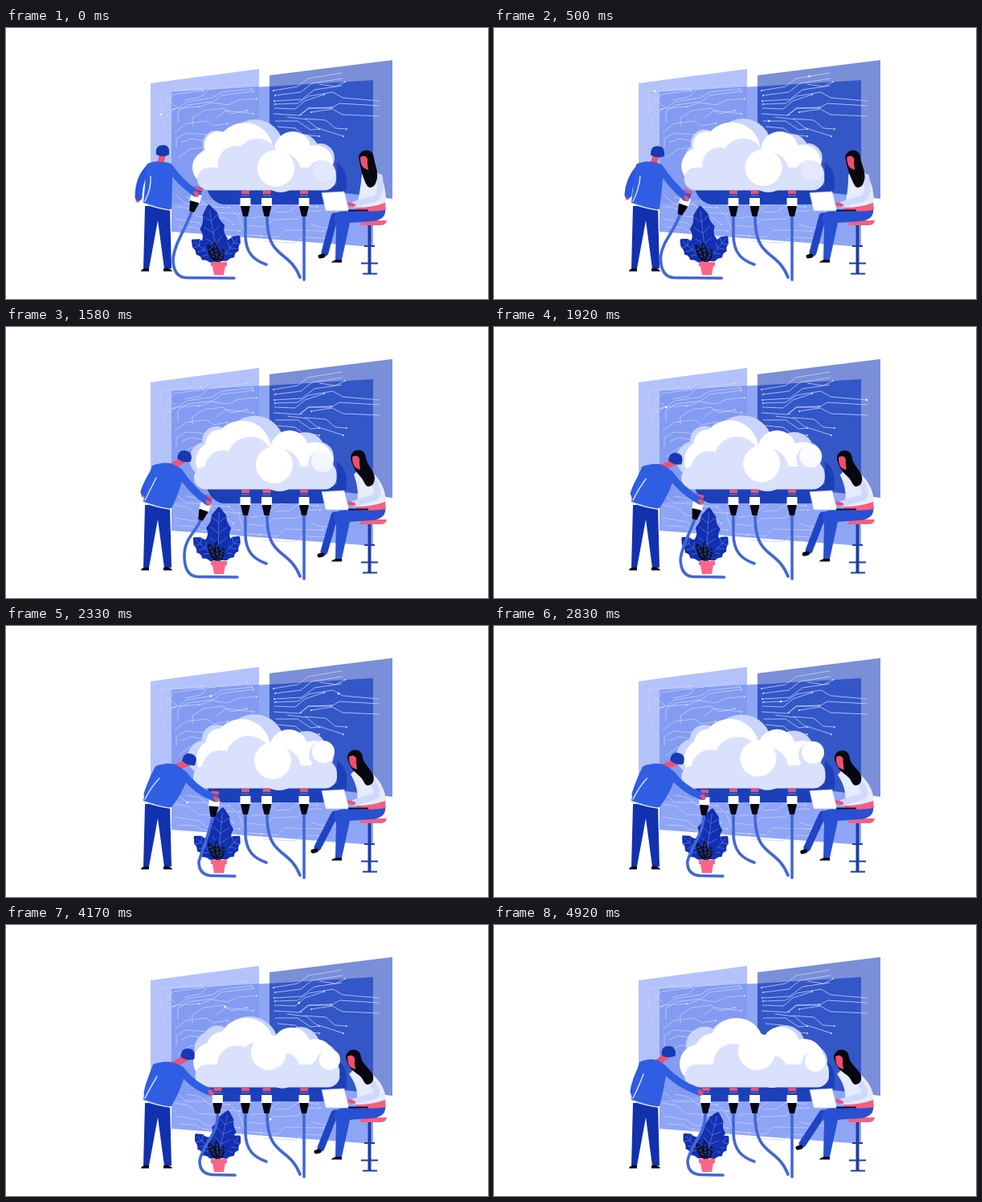
Recreate the animation shown at these times as an HTML page. Size 600 by 338 pixels, loop 5.01 s.

```html
<!DOCTYPE html>
<html lang="en">
<head>
<meta charset="utf-8">
<title>Cloud connection</title>
<style>
html, body { margin: 0; width: 100%; height: 100%; overflow: hidden; background: #fff; }
svg { display: block; width: 600px; height: 338px; }
.trace path { fill: none; stroke: #c3cffc; stroke-width: 1; marker-end: url(#dot); opacity: .8; }
.cable { fill: none; stroke: #4267d6; stroke-width: 3.6; stroke-linecap: round; stroke-linejoin: round; }
.limb { fill: none; stroke-linecap: round; stroke-linejoin: round; }
.back { fill: #c9d5fc; }
.puff { fill: #fff; }
.front { fill: #dae1fd; }
</style>
</head>
<body>
<svg viewBox="0 0 600 338">
  <defs>
    <marker id="dot" viewBox="-2 -2 4 4" markerWidth="3" markerHeight="3"><circle r="1.5" fill="#d5defd"/></marker>
    <g id="plug">
      <path d="M-5-9H5V0H-5z" fill="#1d3eb8"/>
      <path d="M-5-9H5v4H-5z" fill="#e9546f"/>
      <path d="M-5-3H5" stroke="#6f83d8"/>
      <path d="M-6.5 0h13v11h-13z" fill="#fff"/>
      <path d="M-6 10H6L3 23h-6z" fill="#05060f"/>
    </g>
  </defs>

  <path d="M180 69L315 51V208L180 222z" fill="#b4c2fb"/>
  <path d="M206 80L457 65V273L206 254z" fill="#8fa5f5"/>
  <path d="M206 80L315 73V208L206 219z" fill="#839cf1"/>
  <path d="M328 59L481 40V213L328 195z" fill="#7b8fd8"/>
  <path d="M328 73L457 65V210L328 195z" fill="#3457c7"/>
  <g id="traces" class="trace"></g>
  <g id="pulses" fill="#fff"></g>

  <path d="M249 197H412V168Q425 176 424 196Q423 219 402 220H270Q254 217 249 197z" fill="#1c3fba"/>
  <g id="cloud"></g>

  <g class="cable">
    <path d="M298 235V258C298 282 310 290 324 295"/>
    <path d="M325 235C325 290 352 275 366 311"/>
    <path d="M371 235V314"/>
  </g>
  <use href="#plug" x="298" y="212"/>
  <use href="#plug" x="324.500" y="212"/>
  <use href="#plug" x="371" y="212"/>

  <g id="plant"></g>
  <path d="M255 292H275V297H273L271 308H259L257 297H255z" fill="#fb6588"/>

  <g id="stool">
    <path d="M452.500 246V306" stroke="#1c3cab" stroke-width="4"/>
    <path d="M442 293.500H463M444 306.500H462M446 272H459" stroke="#1c3cab" stroke-width="2"/>
    <path d="M440 246Q441 240 452 240H474Q473 246 466 246z" fill="#f5607f"/>
  </g>

  <g id="woman">
    <path id="shin" class="limb" stroke="#1f44c4" stroke-width="9"/>
    <path id="shoe" class="limb" stroke="#05060f" stroke-width="5"/>
    <path d="M405 292Q411 287 418 289V292.500H405z" fill="#05060f"/>
    <path d="M472 225Q474 239 456 241L428 243L418 289H410L411 246Q403 229 422 228z" fill="#2850d2"/>
    <path id="top" fill="#e6ebfe"/>
    <path d="M436 224Q456 224 472 218L473 227Q458 230 436 228z" fill="#f5607f"/>
    <path id="sleeve" class="limb" stroke="#cfd9fc" stroke-width="8"/>
    <path class="limb" d="M433 221L424 219" stroke="#f0506e" stroke-width="4"/>
    <path id="hair" fill="#07070f"/>
    <path id="face" fill="#ef4f6c"/>
    <path d="M393 205.500L421 204L427 228H398z" fill="#fff" stroke="#b9c7f8" stroke-width=".7"/>
    <path d="M426 227.500H451" stroke="#0a1030" stroke-width="2"/>
  </g>

  <path id="cord" class="cable"/>
  <use id="held" href="#plug"/>

  <g id="man">
    <path d="M173 222H204L206 300H197L189 240L178 300H171z" fill="#1131ae"/>
    <path d="M168 303Q170 299 178 300V303.500H168zM196 303V300Q203 298 207 303V303.500H196z" fill="#05060f"/>
    <path id="rearHand" class="limb" stroke="#f0506e" stroke-width="5"/>
    <path id="rearArm" class="limb" stroke="#2b57dc" stroke-width="9"/>
    <path id="neck" class="limb" stroke="#ee5270" stroke-width="8"/>
    <path id="jacket" fill="#2f5ee2"/>
    <path id="arm" class="limb" stroke="#2f5ee2" stroke-width="9"/>
    <path id="hand" class="limb" stroke="#ee5270" stroke-width="5"/>
    <path id="trim" class="limb" stroke="#d4defd" stroke-width="1.500"/>
    <path id="cap" fill="#1839b4"/>
  </g>
</svg>
<script>
const LOOP = 5010;
const POSES = [0, 1000, 1580, 2330, 3420, 4170, 4920];
const THIRDS = [0, 2330, 4920];
const $ = id => document.getElementById(id);
const draw = (id, d) => $(id).setAttribute('d', d);

function add(parent, tag, attrs) {
  const el = document.createElementNS('http://www.w3.org/2000/svg', tag);
  for (const k in attrs) el.setAttribute(k, attrs[k]);
  return $(parent).appendChild(el);
}

// Smooth curve through rows of values, without overshoot.
function track(rows) {
  const times = rows.length === 3 ? THIRDS : POSES;
  const last = times.length - 1;
  return t => {
    t = Math.min(t, times[last]);
    let i = 0;
    while (i < last - 1 && t >= times[i + 1]) i++;
    const h = times[i + 1] - times[i], u = (t - times[i]) / h;
    return rows[0].map((_, k) => {
      const slope = j => (rows[j + 1][k] - rows[j][k]) / (times[j + 1] - times[j]);
      const tangent = j => {
        if (j === 0) return slope(0);
        if (j === last) return slope(last - 1);
        const a = slope(j - 1), b = slope(j);
        return a * b <= 0 ? 0 : 2 * a * b / (a + b);
      };
      const a = rows[i][k], b = rows[i + 1][k];
      const e = u * u * (3 - 2 * u);
      return a + (b - a) * e + h * u * (1 - u) * ((1 - u) * tangent(i) - u * tangent(i + 1));
    });
  };
}

// Circuit traces, by panel
const leftTraces = [
  'M193 108V79l50-4', 'M198 96l10-13 38-5', 'M222 90l20-4 10-9 48-7',
  'M194 104l20-4 11-8 32-5 11-7 38-4', 'M214 118v-14l12-8 32-4 10-8 40-5',
  'M232 122v-10l14-9 24-3 10 7 20-4', 'M210 130l14-11 26-3 8 6 18-3',
  'M212 150v-12l12-7 26 2 10 7', 'M214 162l15-11 24-3', 'M196 124v-12l14-11',
  'M262 112l12-9 34 4', 'M240 99l16-6 20 3 14-6 22-2', 'M218 143l12-5 17 3', 'M200 88l14 12 26-2'
];
const rightTraces = [
  'M418 56l-42 7-13 10-30 5', 'M419 63l-38 6-14 11-32 4', 'M418 72l-34 5-16 12-34 2',
  'M465 91l-46-4-12-7-30 5-14 9-28 1', 'M465 97l-50-3-10 6h-28l-10 8',
  'M465 110l-46-2-13-7-26 4', 'M334 100l26 1 12-10 24-8', 'M333 107l32 2 11-9 29-1',
  'M335 116h28l16 11 11-1', 'M350 111l24 3 12 10 34 11', 'M372 113l26 2 12 10 14 1',
  'M338 123l22 2 10 8 20 2', 'M390 70l20 3 12-6'
];
const lowTraces = [
  'M211 208l14 12h24l12 10 30 2', 'M209 222l18 3 12 10 34 2 10 8', 'M210 238l30 5 9 7 42 3',
  'M214 248l22 1 8 5 42 6', 'M224 211l18 3 10 9 26 1', 'M300 246l22 2 11-9 30-1 8-9 20-1',
  'M302 258l36 3 9-9 48 1', 'M304 237l20-2 13-12 10-5', 'M320 266l40 2 10-7 26 1',
  'M335 230l18-1 9-7 26 1', 'M380 245l14 4 26 2', 'M280 226l10 10 8 22 20 1'
];
const traces = [...leftTraces, ...rightTraces, ...lowTraces].map(d => add('traces', 'path', { d }));
const pulses = [0, 3, 5, 14, 17, 20, 22, 27, 32, 34].map((n, i) => ({
  path: traces[n], size: traces[n].getTotalLength(), start: i * 1730 % LOOP,
  el: add('pulses', 'circle', { r: 1.3 })
}));

// Cloud puffs: x, y, radius
const puffs = [
  ['back', [262, 166, 22], [248, 164, 22], [262, 150, 23]],
  ['back', [262, 145, 17], [262, 141, 18], [264, 146, 19]],
  ['back', [310, 149, 35], [309, 148, 38], [300, 151, 35]],
  ['back', [367, 155, 23], [374, 156, 25], [362, 150, 25]],
  ['back', [391, 162, 18], [389, 162, 19], [394, 170, 21]],
  ['puff', [254, 174, 22], [263, 166, 26], [255, 173, 24]],
  ['puff', [265, 147, 18], [266, 145, 17], [273, 158, 23]],
  ['puff', [297, 154, 36], [293, 152, 36], [302, 150, 34]],
  ['puff', [357, 152, 23], [352, 153, 24], [357, 151, 24]],
  ['puff', [385, 168, 22], [384, 165, 22], [386, 166, 24]],
  ['puff', [360, 170, 28], [360, 170, 28], [360, 170, 28]],
  ['front', [286, 169, 22], [267, 178, 23], [298, 173, 25]],
  ['front', [313, 165, 27], [302, 166, 29], [322, 176, 26]],
  ['front', [342, 180, 25], [340, 178, 27], [346, 183, 20]],
  ['front', [393, 183, 18], [394, 184, 18], [398, 183, 19]]
].map(([kind, ...rows]) => ({ at: track(rows), el: add('cloud', 'circle', { class: kind }) }));
const base = add('cloud', 'rect', { class: 'front', y: 174, height: 28.5, rx: 15 });
const ring = add('cloud', 'circle', { class: 'front' });
const curl = add('cloud', 'circle', { class: 'puff' });
const ball = add('cloud', 'circle', { class: 'puff' });
const sides = track([[238, 411], [233, 412], [237, 417]]);
const ballAt = track([[336, 175, 23], [335, 173, 23], [334, 172, 23], [332, 168, 23], [326, 162, 22], [327, 159, 22], [327, 158, 23]]);
const curlAt = track([[396, 178, 14, .2], [395, 175, 14, .4], [394, 167, 14, .7], [395, 157, 14, 1], [400, 160, 14, 1], [403, 168, 13, 1], [400, 170, 13, 1]]);
const place = (el, [x, y, r]) => {
  el.setAttribute('cx', x); el.setAttribute('cy', y); el.setAttribute('r', r);
};

// Plant leaves: fill, base, half width, tips over time
const leaves = [
  ['#1230b0', [263, 290], 12, [231, 264], [234, 262], [236, 260]],
  ['#1230b0', [266, 290], 12, [291, 259], [291, 262], [292, 263]],
  ['#1230b0', [264, 291], 17, [252, 220], [270, 226], [279, 233]],
  ['#07091a', [263, 292], 5, [251, 270], [252, 270], [252, 272]],
  ['#07091a', [264, 292], 4, [259, 266], [262, 267], [262, 269]],
  ['#07091a', [265, 292], 4, [271, 276], [271, 275], [271, 276]]
].map(([fill, root, width, ...tips]) => ({
  root, width, at: track(tips),
  el: add('plant', 'path', { fill }),
  vein: add('plant', 'path', { fill: 'none', stroke: fill === '#1230b0' ? '#5878e0' : '#3550b8', 'stroke-width': .8 })
}));

function leafPath([x, y], [tx, ty], width) {
  const dx = tx - x, dy = ty - y, len = Math.hypot(dx, dy), pts = [];
  const edge = (s, side) => {
    const lobe = 1 - .2 * Math.abs(Math.cos(s * 13));
    const w = side * width * Math.sin(Math.PI * s ** .85) ** .7 * lobe;
    pts.push((x + dx * s - dy / len * w).toFixed(1) + ' ' + (y + dy * s + dx / len * w).toFixed(1));
  };
  for (let i = 0; i <= 30; i++) edge(i / 30, 1);
  for (let i = 29; i > 0; i--) edge(i / 30, -1);
  return `M${pts.join('L')}z`;
}

function veinPath([x, y], [tx, ty], width) {
  const dx = tx - x, dy = ty - y, len = Math.hypot(dx, dy);
  let d = `M${x} ${y}L${x + dx * .9} ${y + dy * .9}`;
  for (const s of [.3, .5, .7]) for (const side of [-1, 1]) {
    const w = side * width * .6;
    d += `M${x + dx * s} ${y + dy * s}l${dx * .12 - dy / len * w} ${dy * .12 + dx / len * w}`;
  }
  return d;
}

// Man, plug and cord
const man = {
  head: track([[195, 154], [212, 157], [222, 162], [228, 167], [228, 164], [226, 162], [217, 159]]),
  back: track([[177, 170], [181, 170], [184, 173], [188, 175], [186, 175], [185, 174], [183, 171]]),
  front: track([[204, 171], [211, 174], [217, 179], [222, 183], [221, 181], [219, 179], [211, 176]]),
  elbow: track([[217, 193], [223, 197], [230, 203], [237, 206], [235, 202], [233, 201], [229, 199]]),
  hand: track([[236, 206], [242, 216], [251, 218], [261, 215], [256, 210], [254, 208], [256, 208]]),
  rearElbow: track([[165, 186], [171, 192], [174, 197], [178, 201], [178, 201], [177, 200], [175, 196]]),
  rearHand: track([[165, 211], [169, 206], [172, 206], [176, 210], [176, 210], [176, 210], [174, 208]]),
  tilt: track([[0, 0], [8, 1], [14, 1], [20, 1], [14, 1], [10, 1], [2, 1]])
};
const plugAt = track([[237.5, 207, 16], [241, 215, 21], [249.5, 219, 19], [259.5, 215, 5], [263.5, 212, 1], [263.5, 212, 1], [263.5, 212, 1]]);
const cordAt = track([
  [224, 250, 210, 268, 208, 288, 285], [226, 256, 208, 265, 207, 285, 284],
  [238, 255, 222, 262, 222, 285, 289], [254, 255, 246, 275, 240, 294, 286],
  [266, 262, 246, 272, 241, 294, 286], [265, 262, 246, 270, 241, 294, 286],
  [264, 262, 246, 270, 241, 294, 286]
]);

function drawMan(t) {
  const p = {};
  for (const k in man) p[k] = man[k](t);
  const { head: [hx, hy], back: [bx, by], front: [fx, fy], tilt: [tilt, visor] } = p;
  const nx = (bx + fx) / 2 + 1 + visor * 3, ny = Math.min(by, fy) - 3;
  draw('rearHand', `M${p.rearHand}l-1 4`);
  draw('rearArm', `M${bx + 3} ${by + 3}Q${p.rearElbow} ${p.rearHand}`);
  draw('neck', `M${hx - 2 * visor} ${hy + 4}L${nx + 2 * visor} ${ny + 4}`);
  draw('jacket', `M${bx - 2} ${by}Q${(bx + nx) / 2} ${ny - 2} ${nx} ${ny}Q${fx} ${fy - 5} ${fx + 4} ${fy + 2}` +
    `Q${fx + 3} ${fy + 18} 206 226Q189 224 171 218Q173 198 ${bx - 2} ${by}z`);
  draw('arm', `M${fx - 1} ${fy + 2}Q${p.elbow} ${p.hand}`);
  draw('hand', `M${p.hand}l2 2`);
  draw('trim', `M${bx + 3} ${by + 15}Q181 200 173 216M172 219Q189 225 204 227`);
  draw('cap', `M${hx - 8} ${hy + 4}Q${hx - 10} ${hy - 8} ${hx + 1} ${hy - 8}` +
    `Q${hx + 8} ${hy - 8} ${hx + 8 + visor} ${hy}L${hx + 8 + visor} ${hy + 4}Q${hx} ${hy + 8} ${hx - 8} ${hy + 4}z`);
  $('cap').setAttribute('transform', `rotate(${tilt} ${hx} ${hy})`);

  const [x, y, turn] = plugAt(t), a = turn * Math.PI / 180;
  $('held').setAttribute('transform', `translate(${x} ${y}) rotate(${turn})`);
  const [ax, ay, cx, cy, mx, my, end] = cordAt(t);
  draw('cord', `M${x - 22 * Math.sin(a)} ${y + 22 * Math.cos(a)}C${ax} ${ay} ${cx} ${cy} ${mx} ${my}` +
    `Q${mx} 311 ${mx + 17} 311.500L${end - 1} 312`);
}

// Woman
const faceAt = track([[447, 164], [443, 164], [437, 165], [433, 166], [431, 167], [431, 167], [431, 167]]);
const footAt = track([[394, 284], [394, 284], [393, 284], [385, 280], [389, 282], [389, 282], [381, 277]]);

function drawWoman(t) {
  const [x, y] = faceAt(t), [fx, fy] = footAt(t);
  const tip = 453 - (447 - x) * .2;
  draw('shin', `M435 234L409 235L${fx + 3} ${fy - 4}`);
  draw('shoe', `M${fx + 1} ${fy}l-4 1`);
  draw('top', `M${x + 2} ${y + 13}C${x + 20} ${y + 8} 474 198 473 221Q456 227 436 224Q441 205 ${x - 4} ${y + 19}z`);
  draw('sleeve', `M${x + 18} ${y + 22}Q468 210 458 213L434 220`);
  draw('hair', `M${x - 8} ${y - 2}C${x - 7} ${y - 14} ${x + 10} ${y - 15} ${x + 11} ${y - 2}` +
    `C${x + 13} ${y + 10} ${tip + 13} 183 ${tip + 6} 196Q${tip - 1} 203 ${tip - 5} 194` +
    `C${tip - 9} 184 ${x - 4} ${y + 18} ${x - 8} ${y - 2}z`);
  draw('face', `M${x - 6} ${y - 3}Q${x} ${y - 7} ${x + 3} ${y - 1}L${x + 3} ${y + 5}L${x + 4} ${y + 13}L${x - 1} ${y + 11}Q${x - 6} ${y + 8} ${x - 6} ${y - 3}z`);
}

function drawCloud(t) {
  for (const p of puffs) place(p.el, p.at(t));
  const [l, r] = sides(t);
  base.setAttribute('x', l);
  base.setAttribute('width', r - l);
  const [x, y, size, white] = curlAt(t);
  place(ring, [x - 3, y + 3, size + 1]);
  place(curl, [x, y, size]);
  curl.setAttribute('opacity', white);
  place(ball, ballAt(t));
}

function render(t) {
  drawCloud(t);
  drawMan(t);
  drawWoman(t);
  for (const leaf of leaves) {
    const tip = leaf.at(t);
    leaf.el.setAttribute('d', leafPath(leaf.root, tip, leaf.width));
    leaf.vein.setAttribute('d', veinPath(leaf.root, tip, leaf.width));
  }
  for (const p of pulses) {
    const u = (t - p.start + LOOP) % LOOP / 1100;
    p.el.setAttribute('opacity', u < 1 ? 1 : 0);
    if (u < 1) {
      const at = p.path.getPointAtLength(u * p.size);
      place(p.el, [at.x, at.y, 1.3]);
    }
  }
}

const begin = performance.now();
function tick() {
  render((performance.now() - begin) % LOOP);
  requestAnimationFrame(tick);
}
tick();
</script>
</body>
</html>
```
